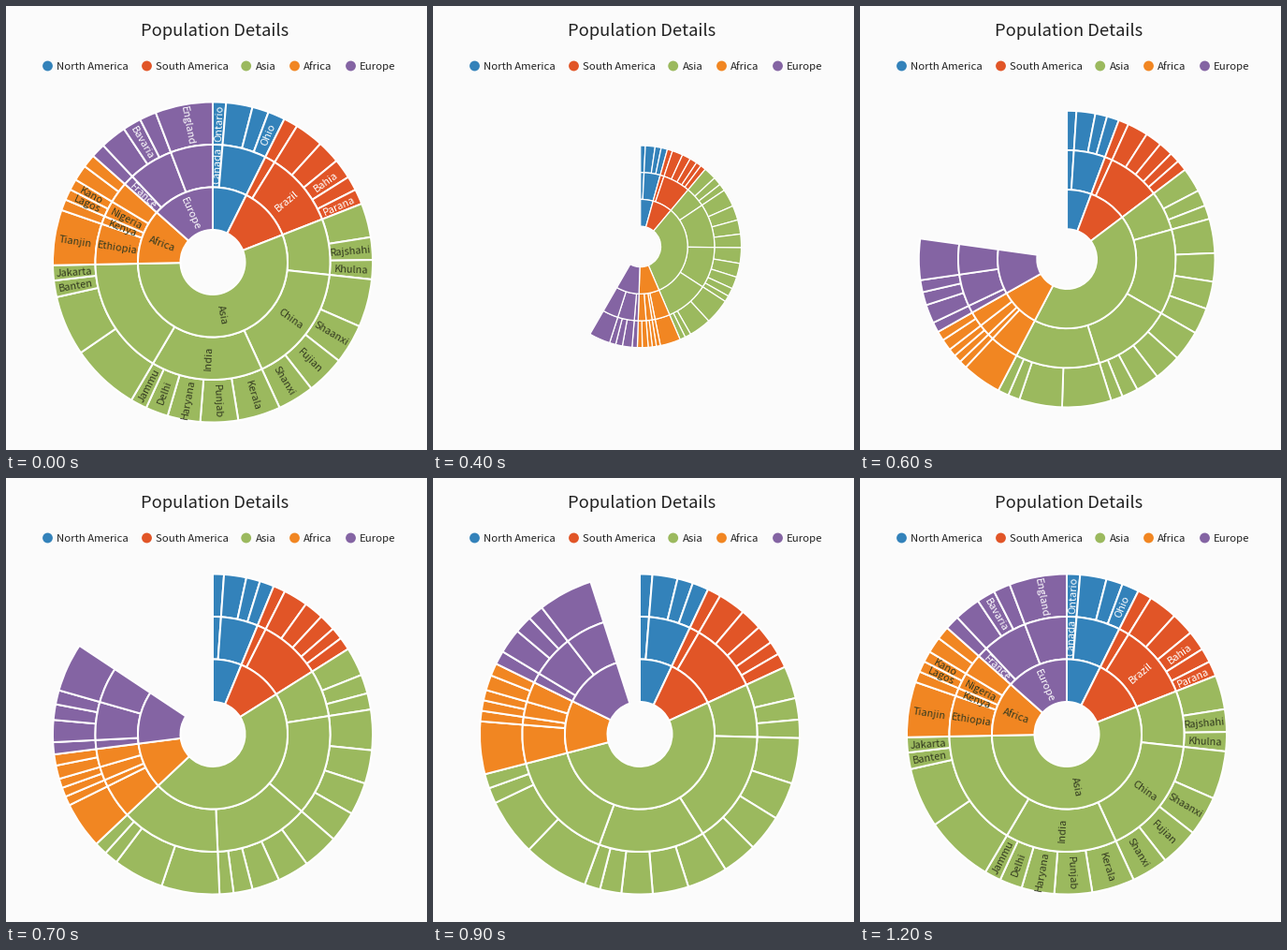
A matplotlib script for the animation above (1.7 s loop, 450x474 px).

```python
import numpy as np
import matplotlib.pyplot as plt
from matplotlib.animation import FuncAnimation
from matplotlib.patches import Circle, Wedge

W, H, DPI = 450, 474, 100
PX = 72 / DPI
FRAMES, STEP = 17, 100
CENTER = np.array([221.0, 273.5])
PIVOT = np.array([223.0, 228.5])
HOLE, RING = 34.5, 45.5
FONT = "Noto Sans CJK JP"
LIGHT, DARK = "white", "#333a20"

# sweep progress before easing
TIMES = [300, 500, 700, 900]
PROGRESS = [0.268, 0.441, 0.604, 0.777]

# continent, colour, label colour, legend x, [(country, [(region, degrees)])]
DATA = [
    ("North America", "#3382ba", LIGHT, 44.5, [
        ("Canada", [("Ontario", 4.8)]),
        ("", [("", 9.6), ("", 6.0), ("Ohio", 6.2)])]),
    ("South America", "#e15527", LIGHT, 150.5, [
        ("", [("", 5.2)]),
        ("Brazil", [("", 10.5), ("", 8.4), ("Bahia", 7.2), ("", 5.2),
                    ("Parana", 5.5)])]),
    ("Asia", "#9bb95e", DARK, 256.7, [
        ("", [("", 12.4), ("Rajshahi", 8.2), ("Khulna", 7.0)]),
        ("China", [("", 17.4), ("Shaanxi", 14.4), ("Fujian", 14.0),
                   ("Shanxi", 13.3)]),
        ("India", [("Kerala", 15.5), ("Punjab", 13.7), ("Haryana", 11.9),
                   ("Delhi", 8.2), ("Jammu", 6.0)]),
        ("", [("", 25.0), ("", 21.8), ("Banten", 6.0), ("Jakarta", 5.5)])]),
    ("Africa", "#f18622", DARK, 308.5, [
        ("Ethiopia", [("Tianjin", 20.1)]),
        ("Kenya", [("", 4.0)]),
        ("Nigeria", [("Lagos", 4.0), ("Kano", 4.0)]),
        ("", [("", 5.8), ("", 4.8)])]),
    ("Europe", "#8464a3", LIGHT, 368.5, [
        ("France", [("", 5.2)]),
        ("", [("", 9.5), ("Bavaria", 6.7), ("", 6.1)]),
        ("", [("England", 20.9)])]),
]

fig = plt.figure(figsize=(W / DPI, H / DPI), dpi=DPI, facecolor="#fbfbfb")
ax = fig.add_axes([0, 0, 1, 1])
ax.set(xlim=(0, W), ylim=(H, 0))
ax.axis("off")


def write(x, y, s, px, **kw):
    return ax.text(x, y, s, fontsize=px * PX, family=FONT, va="baseline",
                   rotation_mode="anchor", **kw)


wedges, labels = [], []


def add_sector(level, start, end, color, name, ink):
    wedge = Wedge(CENTER, 1, 0, 1, facecolor=color, edgecolor="white",
                  joinstyle="miter")
    ax.add_patch(wedge)
    wedges.append((wedge, level, start, end))
    if not name:
        return
    mid = (start + end) / 2 - 90
    a = np.radians(mid)
    x, y = CENTER + (HOLE + RING * (level + 0.5)) * np.array([np.cos(a), np.sin(a)])
    # text reads outward on the right half and inward on the left half
    turn = mid if mid < 90 else mid - 180
    t = np.radians(turn)
    drop = 4
    labels.append(write(x - drop * np.sin(t), y + drop * np.cos(t), name, 11,
                        color=ink, ha="center", rotation=-turn, zorder=5))


write(223, 32, "Population Details", 18.4, color="#222222", ha="center")

angle = 0
for name, color, ink, lx, countries in DATA:
    ax.add_patch(Circle((lx, 64), 5.4, color=color, lw=0))
    write(lx + 9.8, 68, name, 11.4, color="#222222", ha="left")
    first = angle
    for country, regions in countries:
        begin = angle
        for region, size in regions:
            add_sector(2, angle, angle + size, color, region, ink)
            angle += size
        add_sector(1, begin, angle, color, country, ink)
    # the long continent names do not fit their sectors
    add_sector(0, first, angle, color, "" if " " in name else name, ink)
TOTAL = angle


def pose(ms):
    """Sweep fraction, scale and label opacity at a time."""
    if ms < 300 or ms >= 1200:
        return 1, 1, 1
    if ms >= 1000:
        return 1, 1, 0.45 + 0.3 * (ms - 1000) / 100
    u = np.interp(ms, TIMES, PROGRESS)
    return 1 - (1 - u) ** 2, min(1, 0.483 + 0.1475 * (ms - 300) / 100), 0


def draw(i):
    sweep, scale, alpha = pose(i * STEP)
    center = PIVOT + scale * (CENTER - PIVOT)
    turn = 360 / TOTAL * sweep
    for wedge, level, start, end in wedges:
        wedge.set_center(tuple(center))
        wedge.set_radius(scale * (HOLE + RING * (level + 1)))
        wedge.set_width(scale * RING)
        wedge.set_theta1(start * turn - 90)
        wedge.set_theta2(end * turn - 90)
        wedge.set_linewidth(2 * scale * PX)
    for label in labels:
        label.set_alpha(alpha)
    return []


anim = FuncAnimation(fig, draw, frames=FRAMES, interval=STEP,
                     init_func=lambda: [], repeat=True, repeat_delay=0)
plt.show()
```
